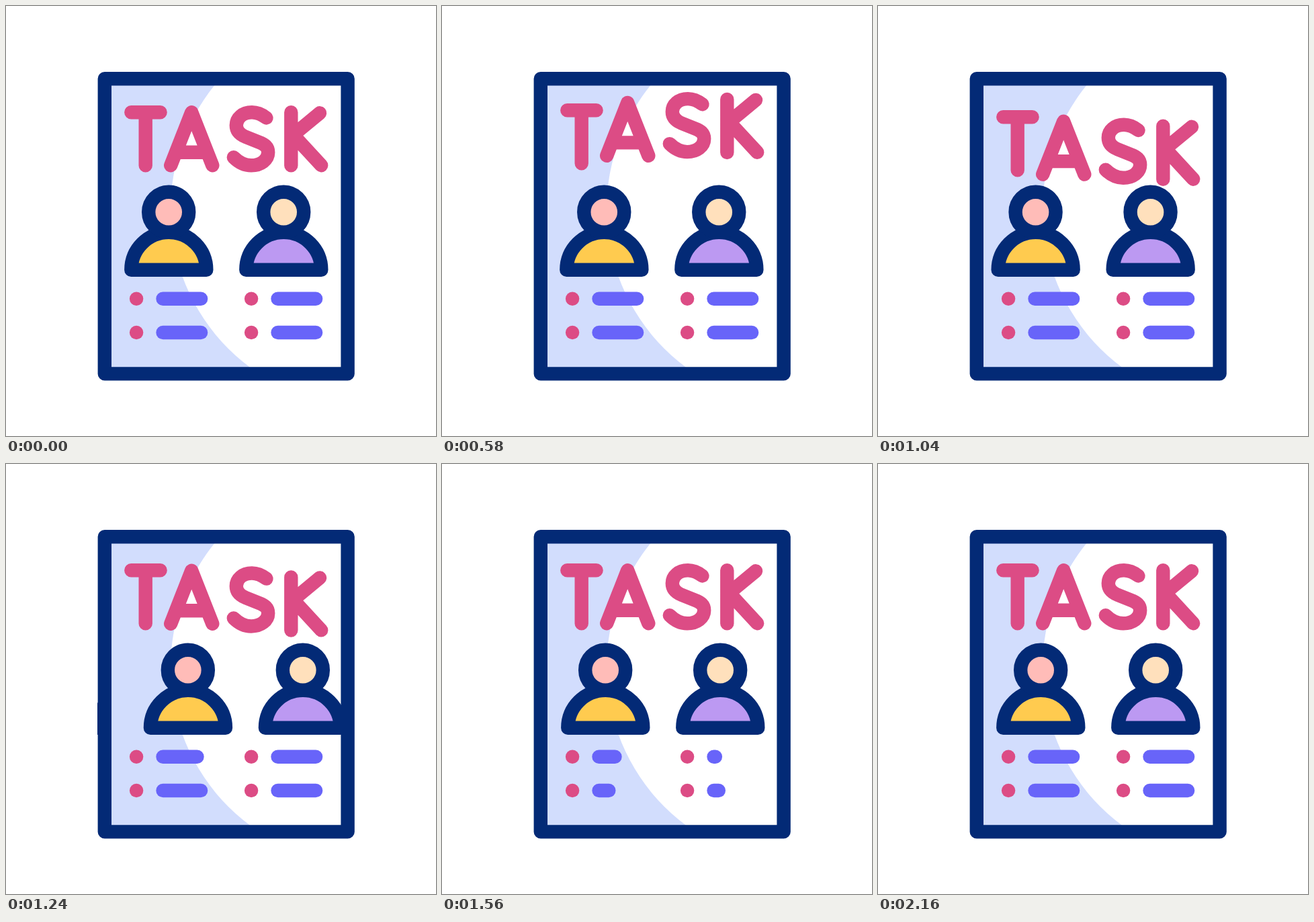
Recreate the animation shown at these times as an HTML page. Size 640 by 640 pixels, loop 2220 ms.

```html
<!DOCTYPE html>
<html lang="en">
<head>
<meta charset="utf-8">
<title>Task board</title>
<style>
  html, body { margin: 0; width: 100%; height: 100%; overflow: hidden; background: #fff; }
  svg { display: block; width: 100%; height: 100%; }
  .line { fill: none; stroke-width: 20.4; stroke-linecap: round; stroke-linejoin: round; }
  .navy { stroke: #032a76; }
  .pink { stroke: #dc4c85; }
  .blue { stroke: #6864f9; }
</style>
</head>
<body>
<svg viewBox="0 0 640 640">
  <defs>
    <clipPath id="page"><rect x="147" y="108" width="362" height="439"/></clipPath>
    <clipPath id="row"><rect x="136" y="250" width="383" height="170"/></clipPath>
  </defs>
  <g clip-path="url(#page)">
    <rect x="147" y="108" width="362" height="439" fill="#d2ddfd"/>
    <circle cx="538.3" cy="302.6" r="293.3" fill="#fff"/>
  </g>
  <g id="title" class="line pink">
    <path d="M186.3 158.3H229.6M207.7 158.3V237.4"/>
    <path d="M245.2 237.2L276.2 158.3L307.3 237.2M256 217.8H297"/>
    <path d="M387.5 166.5C381 161.5 375 158.3 366 158.3C352 158.3 342.8 167 342.8 177.5C342.8 186 348 191 356 194.5L376 202.5C385 206 390.2 209.5 390.2 218C390.2 229 379 237.3 365 237.3C354 237.3 346 232.5 338.8 225.3"/>
    <path d="M424.3 158.3V237.4M467 159.3L427.5 192L469.2 237.2"/>
  </g>
  <g clip-path="url(#row)"><g id="people" class="line navy"></g></g>
  <g id="list" class="line"></g>
  <rect class="line navy" x="146.8" y="108.3" width="361.8" height="439.1"/>
</svg>
<script>
const LOOP = 2220, SPAN = 360, GAP = 171;
const $ = id => document.getElementById(id);
const clamp = v => Math.min(1, Math.max(0, v));
const sine = p => (1 - Math.cos(Math.PI * p)) / 2;
const quad = p => p < .5 ? 2 * p * p : 1 - 2 * (1 - p) ** 2;

// keys: [time, value, easing into this key]
function track(keys, t) {
  let v = keys[0][1];
  for (let i = 1; i < keys.length; i++) {
    const [t0, v0] = keys[i - 1], [t1, v1, ease = sine] = keys[i];
    v += (v1 - v0) * ease(clamp((t - t0) / (t1 - t0)));
  }
  return v;
}

const bounce = [[0, 0], [400, -20.5], [800, 20.5], [1200, 0]];
const slide = [[420, 0], [1141, -8], [1592, SPAN + 4.5, quad], [2170, SPAN]];
const resize = [[1200, 56.6], [1400, .6], [1760, 56.6]];

const person = (x, skin, shirt) => `<g transform="translate(${x})">
  <path fill="${shirt}" d="M186.3 392.8A56 56 0 0 1 298.3 392.8Z"/>
  <circle fill="${skin}" cx="242.2" cy="306.7" r="30"/></g>`;

$('people').innerHTML = [-SPAN, 0].map(x =>
  person(x, '#ffbcb8', '#ffcb4f') + person(x + GAP, '#ffe0bc', '#bc99f2')).join('');

// rows in the order in which they shrink
const rows = [[0, 435.8], [0, 486], [GAP, 486], [GAP, 435.8]];
$('list').innerHTML = rows.map(([x, y]) =>
  `<path class="pink" d="M${194.1 + x} ${y}h.01"/><path class="blue bar"/>`).join('');

const letters = [...$('title').children];
const bars = [...document.querySelectorAll('.bar')];

function draw() {
  const t = performance.now() % LOOP;
  letters.forEach((el, i) =>
    el.setAttribute('transform', `translate(0 ${track(bounce, t - 80 * i)})`));
  $('people').setAttribute('transform', `translate(${track(slide, t)})`);
  bars.forEach((el, i) => {
    const [x, y] = rows[i];
    el.setAttribute('d', `M${233.5 + x} ${y}h${track(resize, t - 40 * i)}`);
  });
  requestAnimationFrame(draw);
}
draw();
</script>
</body>
</html>
```
